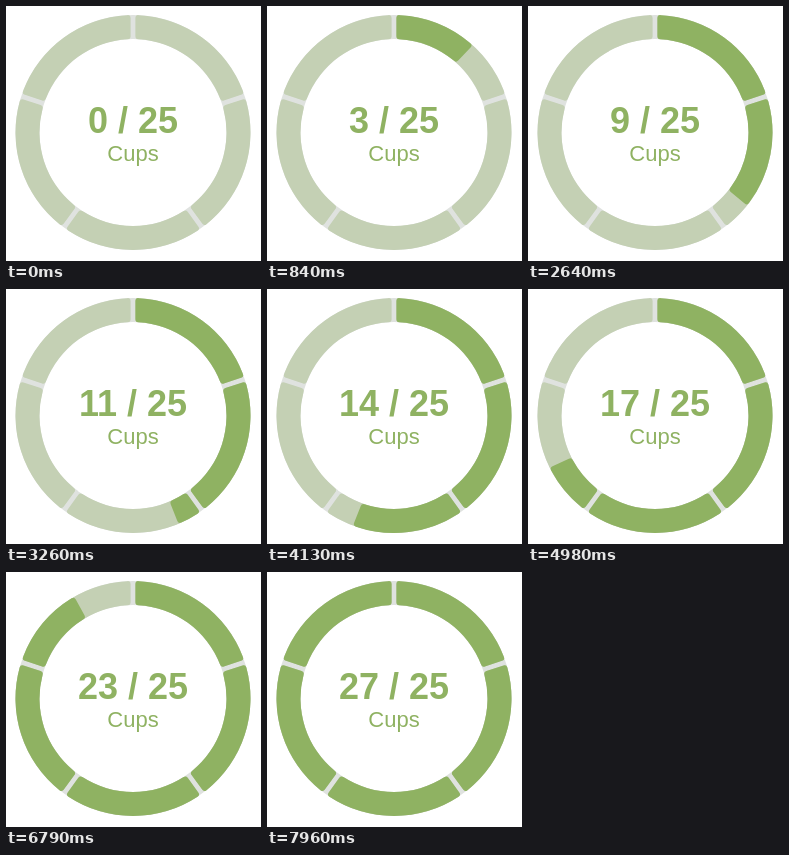
Write an HTML page that moves like this. It is 255x255 px and loops after 8 s.

```html
<!DOCTYPE html>
<html lang="en">
<head>
<meta charset="utf-8">
<title>Cups counter</title>
<style>
  html, body { margin: 0; width: 100%; height: 100%; overflow: hidden; background: #fff; }
  svg { display: block; width: 100vw; height: 100vh; }
  text { font-family: "Liberation Sans", Arial, sans-serif; fill: #8fb262; text-anchor: middle; }
</style>
</head>
<body>
<svg viewBox="0 0 255 255">
  <g transform="translate(127 126.5)">
    <circle r="105.5" fill="none" stroke="#dfe2df" stroke-width="24"/>
    <g id="track" fill="#c4d0b4"></g>
    <g id="fill" fill="#8fb262"></g>
  </g>
  <text id="count" x="127" y="127" font-size="36" font-weight="bold">0 / 25</text>
  <text x="127" y="155" font-size="22">Cups</text>
</svg>
<script>
const LOOP = 8000, GOAL = 25, PARTS = 5, PER = GOAL / PARTS;
const OUTER = 117.5, INNER = 93.5, GAP = 2.4, CORNER = 3;
// moments at which one more cup is counted
const TICKS = [290, 610, 840, 1160, 1460, 1770, 2000, 2320, 2640, 2960, 3260, 3490, 3810, 4130,
  4360, 4680, 4980, 5300, 5530, 5850, 6170, 6470, 6790, 7020, 7340, 7660, 7960];
const $ = id => document.getElementById(id);

// point at a distance along a clockwise-from-top ray, shifted sideways
function at(angle, along, side) {
  const s = Math.sin(angle), c = Math.cos(angle);
  return `${(along * s + side * c).toFixed(3)} ${(-along * c + side * s).toFixed(3)}`;
}

// ring segment with parallel gaps and rounded corners
function segment(from, to) {
  const side = GAP + CORNER;
  const ro = OUTER - CORNER, ri = INNER + CORNER;
  const ao = Math.asin(side / ro), ai = Math.asin(side / ri);
  const lo = Math.sqrt(ro * ro - side * side), li = Math.sqrt(ri * ri - side * side);
  const bend = p => `A${CORNER} ${CORNER} 0 0 1 ${p}`;
  return `M${at(from, lo, GAP)}` + bend(at(from + ao, OUTER, 0)) +
    `A${OUTER} ${OUTER} 0 0 1 ${at(to - ao, OUTER, 0)}` + bend(at(to, lo, -GAP)) +
    `L${at(to, li, -GAP)}` + bend(at(to - ai, INNER, 0)) +
    `A${INNER} ${INNER} 0 0 0 ${at(from + ai, INNER, 0)}` + bend(at(from, li, GAP)) + 'Z';
}

const cupAngle = n => n / GOAL * 2 * Math.PI;

function addPaths(group) {
  return Array.from({ length: PARTS }, () =>
    group.appendChild(document.createElementNS('http://www.w3.org/2000/svg', 'path')));
}

addPaths($('track')).forEach((p, i) =>
  p.setAttribute('d', segment(cupAngle(i * PER), cupAngle((i + 1) * PER))));
const fills = addPaths($('fill'));

let shown = -1;
function draw(t) {
  const cups = TICKS.filter(tick => tick <= t).length;
  if (cups === shown) return;
  shown = cups;
  $('count').textContent = `${cups} / ${GOAL}`;
  fills.forEach((p, i) => {
    const start = i * PER, end = Math.min(cups, start + PER);
    p.setAttribute('d', end > start ? segment(cupAngle(start), cupAngle(end)) : '');
  });
}

const began = performance.now();
function tick() {
  draw((performance.now() - began) % LOOP);
  requestAnimationFrame(tick);
}
tick();
</script>
</body>
</html>
```
